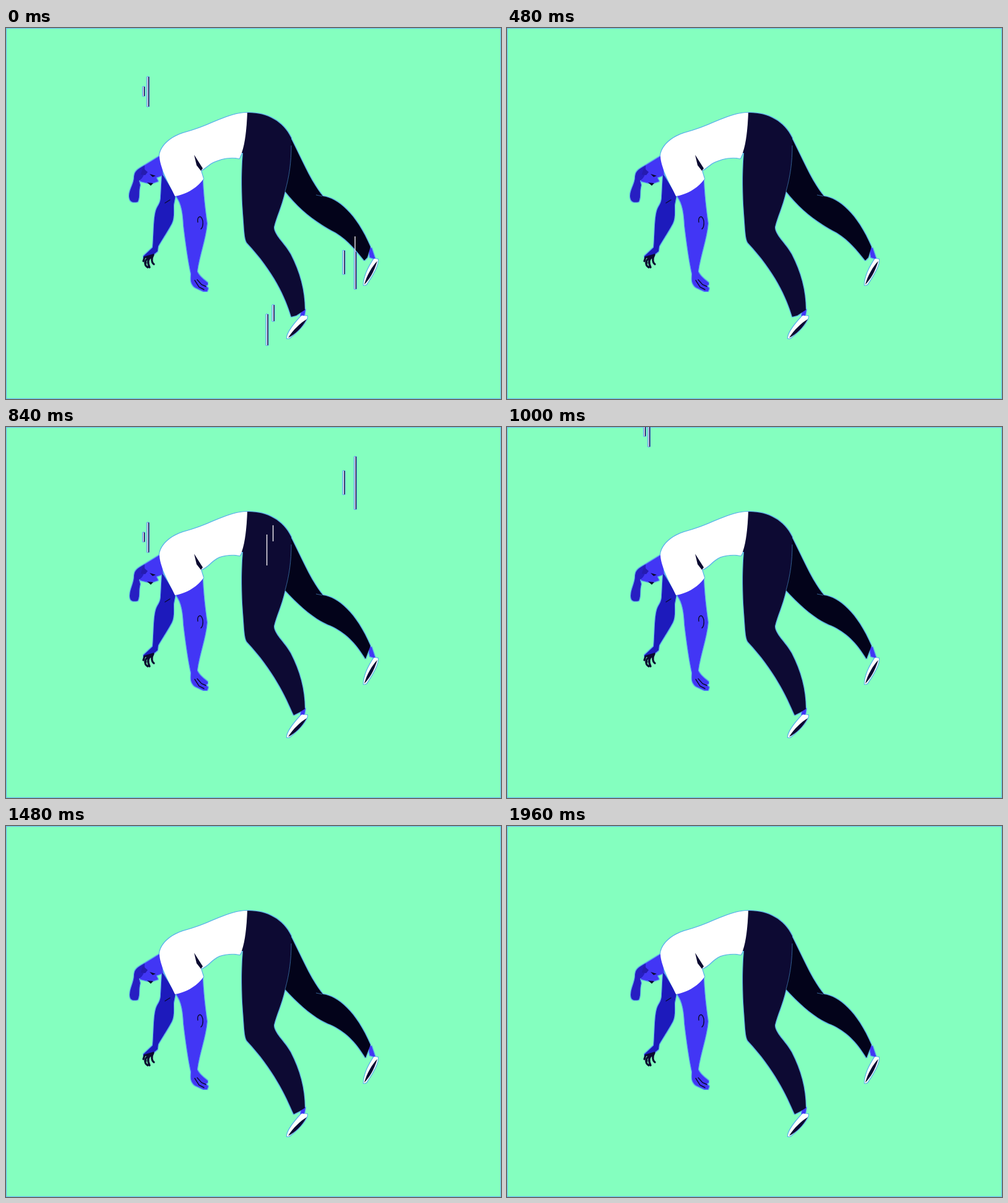
An HTML page that plays this animation: 800x600 px, repeating every 2000 ms.

```html
<!DOCTYPE html>
<html lang="en">
<head>
<meta charset="utf-8">
<title>Falling</title>
<style>
  html, body { margin: 0; width: 100%; height: 100%; overflow: hidden; background: #84ffbf; }
  svg { display: block; width: 100vw; height: 100vh; }
</style>
</head>
<body>
<svg id="stage" viewBox="0 0 800 600">
  <defs>
    <g id="limbs">
      <path fill="#1d1abc" d="M252 235L274 271L271 286C271 298 272 308 268 316C260 331 252 342 246 353L245 361L238 367L222 372L222 369L237 355C239 335 238 306 243 293C246 286 250 283 250 272Z"/>
      <path fill="#4236f5" d="M273 270L318 245C319 270 322 295 325 316C323 340 312 370 309 394C312 401 320 407 326 412L326 415L323 417L327 421L325 426L319 426L306 420C298 414 298 407 299 398C294 375 290 345 287 320C286 300 284 284 275 272Z"/>
      <path fill="#4236f5" d="M585 354L591 356L597 374L588 371ZM477 454L484 455L482 467L476 466Z"/>
      <path fill="#fff" d="M595 373L601 374C602 383 593 399 582 415L578 416C578 403 585 388 595 373Z"/>
      <path fill="#fff" d="M478 465L487 466C487 474 472 491 457 502L454 502C454 493 466 478 478 465Z"/>
    </g>
    <path id="face" fill="#4236f5" d="M250 206L224 222L212 238L217 248L229 251L237 251L246 248L243 242L254 238Z"/>
    <path id="hair" fill="#271ec2"/>
    <path id="backLeg" fill="#03031a"/>
    <path id="frontLeg" fill="#0d0a33"/>
    <path id="shirt" fill="#fff"/>
    <g id="body">
      <use href="#limbs"/><use href="#face"/><use href="#hair"/>
      <use href="#backLeg"/><use href="#frontLeg"/><use href="#shirt"/>
    </g>
    <filter id="rim" x="-5%" y="-5%" width="110%" height="110%">
      <feMorphology in="SourceAlpha" operator="dilate" radius="1"/>
      <feComposite in2="SourceAlpha" operator="out" result="edge"/>
      <feFlood flood-color="#59a8f2"/>
      <feComposite in2="edge" operator="in"/>
    </filter>
  </defs>
  <rect width="800" height="600" fill="#84ffbf"/>
  <rect x=".5" y=".5" width="799" height="599" fill="none" stroke="#67b4f7"/>
  <g id="shadows"></g>
  <use href="#body" filter="url(#rim)"/>
  <use href="#body"/>
  <g fill="#0b0930">
    <path d="M304 205L318 227L315 231L308 222Z"/>
    <path d="M228 250L238 251L234 255ZM232 236L242 239L237 241Z"/>
    <path d="M600 377C592 385 583 400 579 415C587 407 595 394 600 377Z"/>
    <path d="M486 471C477 476 463 489 456 501C467 496 479 484 486 471Z"/>
  </g>
  <path fill="#261bb0" d="M221 226L229 233L225 238L218 237Z"/>
  <g fill="none" stroke="#0b0930" stroke-linecap="round">
    <path stroke-width="3.2" d="M238 367L224 371L222 377M238 367C230 369 224 376 226 380M235 370C227 375 230 383 232 387M238 367C234 374 236 380 239 382M229 373C222 378 225 385 229 387"/>
    <path stroke-width="1.4" d="M257 283L265 278M310 314C308 305 316 301 318 312C319 319 317 324 315 325M305 408L312 419L320 423M309 407L316 415L323 418"/>
  </g>
  <path d="M461 190C461 217 458 239 451 264M501 270L511 272" fill="none" stroke="#3f78b0" stroke-width=".8"/>
  <g id="cores"></g>
</svg>
<script>
const FRAME = 40, LOOP = 2000;
const byId = id => document.getElementById(id);

// Speed lines: x, top relative to the group, height
const legLines = { repeat: 600, end: 320, travel: 432.5, decay: .0046, rest: -95.5,
  lines: [[546, 23, 38], [564.5, 0, 85], [432, 111, 26], [422, 126, 50]] };
const headLines = { repeat: 880, end: 240, travel: 126, decay: .01175, rest: -47,
  lines: [[222.5, 16, 15], [229.5, 0, 48]] };
const groups = [legLines, headLines];

function addBar(parent, x, y, width, height, fill) {
  const bar = document.createElementNS('http://www.w3.org/2000/svg', 'rect');
  const attrs = { x: x - width / 2, y, width, height, fill, rx: width > 3 ? 1.5 : 0 };
  for (const name in attrs) bar.setAttribute(name, attrs[name]);
  parent.append(bar);
}

function addLayer(parentId) {
  const layer = document.createElementNS('http://www.w3.org/2000/svg', 'g');
  byId(parentId).append(layer);
  return layer;
}

for (const group of groups) {
  const shadow = addLayer('shadows'), core = addLayer('cores');
  group.layers = [shadow, core];
  for (const [x, y, h] of group.lines) {
    addBar(shadow, x, y - 1, 5, h + 2, '#62aaf5');
    addBar(shadow, x + .5, y, 2.6, h, '#15104a');
    addBar(core, x - .4, y, 1.4, h, '#f4f0f4');
  }
}

// Loose cloth and hair flutter between two shapes
function drawCloth(flap) {
  const pick = (a, b) => flap ? b : a;
  const shapes = {
    hair: `M224 222C211 229 208 232 207 240C207 253 ${pick('198 262 199 273', '200 262 200 273')}
      C200 282 206 283 213 281C217 272 214 264 217 254L215 247C223 242 225 234 224 222Z`,
    shirt: `M390 137C360 137 330 158 293 168C265 175 249 192 248 207C248 225 265 255 273 272
      C290 270 310 258 319 244L315 231
      ${pick('L331 219C346 211 363 208 377 211', 'C326 227 334 214 345 210C358 206 368 206 378 208')}
      L381 202C387 185 389 160 390 137Z`,
    backLeg: `M457 172C475 205 490 245 512 272C536 275 566 300 589 354L${pick('584 371L579 376', '581 375')}
      ${pick('C565 359 555 345 533 331C505 317 475 295 451 264', 'C565 348 548 332 524 321C500 312 475 290 451 264')}Z`,
    frontLeg: `M389 137C420 136 448 150 461 178C462 205 460 230 451 264C445 290 437 305 433 322
      C433 335 450 348 460 366C475 395 483 425 483 456L${pick('469 465L461 467', '475 461L465 466')}
      C452 436 433 394 389 347C385 340 385 325 383 300C380 260 381 225 383 202L380 202C386 185 389 160 389 137Z`
  };
  for (const id in shapes) byId(id).setAttribute('d', shapes[id]);
}

function drawLines(t) {
  for (const { repeat, end, travel, decay, rest, layers } of groups) {
    const s = t < end ? t : t - repeat;
    const y = rest + travel * Math.exp(-decay * s);
    for (const layer of layers) {
      layer.setAttribute('display', s < end && y < 600 ? 'inline' : 'none');
      layer.setAttribute('transform', `translate(0 ${Math.min(y, 700)})`);
    }
  }
}

const start = performance.now();
function render() {
  const elapsed = Math.max(0, performance.now() - start) % LOOP;
  const step = Math.floor(elapsed / FRAME);
  drawCloth(step % 2);
  drawLines(step * FRAME);
  requestAnimationFrame(render);
}
render();
</script>
</body>
</html>
```
